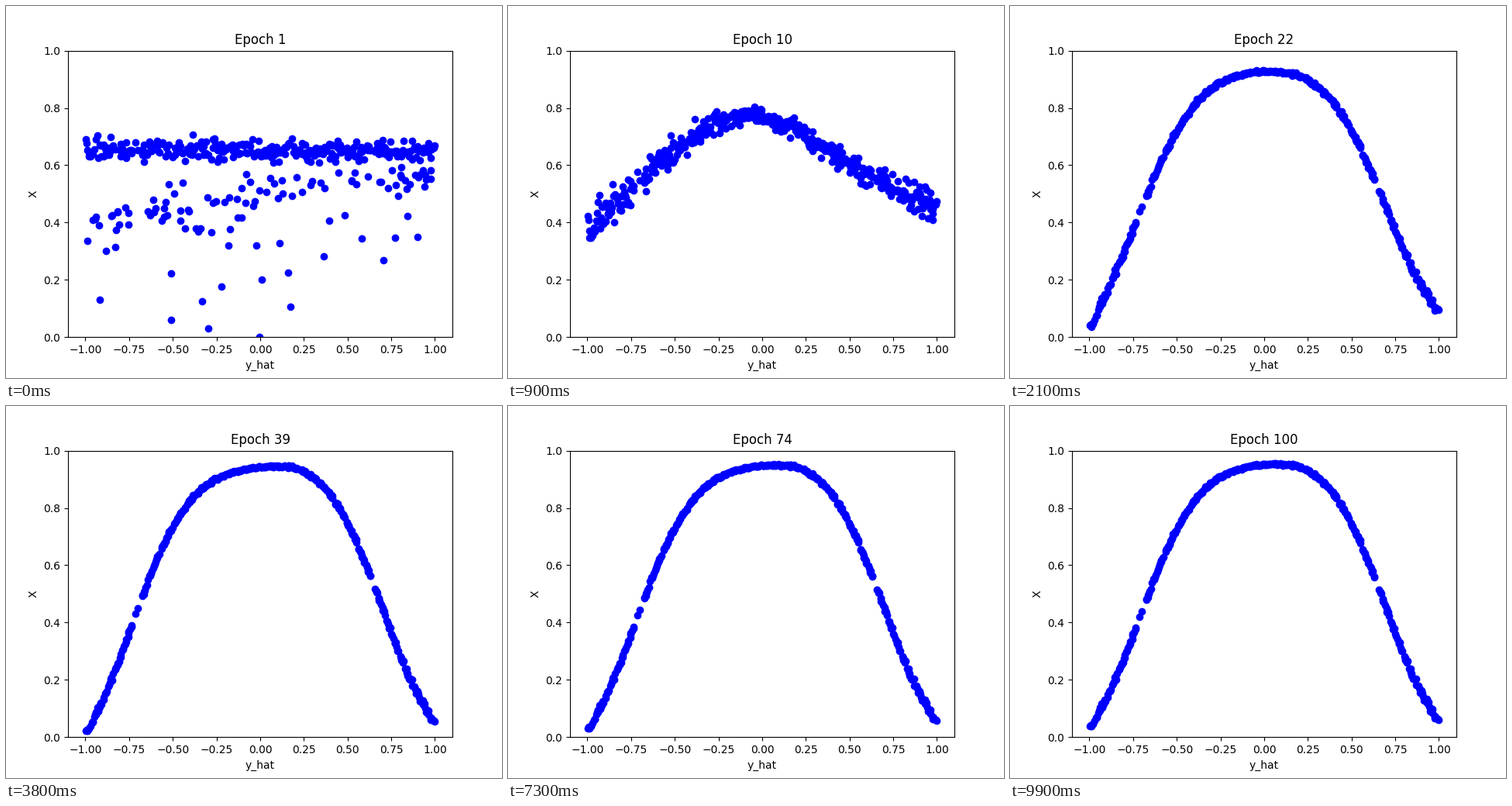
Animation of 640 by 480 pixels, one loop 10000 ms. Source, as a matplotlib script:

```python
import numpy as np
import matplotlib.pyplot as plt
from matplotlib.animation import FuncAnimation

EPOCHS = 100
SAMPLES = 410
WARMUP = 115  # samples seen before the first epoch levels off

rng = np.random.default_rng(7)

# Key points of the mean curve sit at Chebyshev nodes
NODES = -np.cos(np.linspace(0, np.pi, 9))

# epoch, easing towards it, spread (centre, growth left, growth right), values
STAGES = [
    (1, None, (.019, .004, -.003),
     [.65, .652, .656, .66, .652, .65, .648, .647, .65]),
    (10, lambda u: u ** 1.6, (.014, .023, .014),
     [.36, .42, .548, .71, .77, .65, .53, .465, .44]),
    (22, lambda u: 1 - (1 - u) ** 2, (.002, .006, .006),
     [.025, .127, .445, .823, .928, .828, .435, .152, .085]),
    (39, lambda u: 1 - (1 - u) ** 3, (.0015, .004, .005),
     [.012, .099, .439, .839, .943, .86, .435, .122, .045]),
    (100, lambda u: u, (.0015, .004, .005),
     [.028, .112, .428, .839, .952, .86, .432, .126, .05]),
]


def sample_x():
    """Evenly jittered inputs in random order, with two narrow gaps."""
    x = np.linspace(-.999, 1, SAMPLES) + rng.normal(0, .004, SAMPLES)
    x = x.clip(-.999, 1)
    gap = (abs(x + .707) < .025) | (abs(x - .64) < .009)
    x = np.append(x[~gap], [-.715, -.7])
    rng.shuffle(x)
    x[0] = -.004
    return x


def spread(x, centre, left, right):
    return centre + np.where(x < 0, left, right) * np.abs(x)


def warmup(x):
    """Predictions climbing from zero during the first samples."""
    rise = 1 - np.exp(-np.arange(len(x)) / 14)
    sd = .016 + .05 * np.exp(-((x + .25) / .35) ** 2)
    return rise * (.415 + .09 * (x + 1) + rng.normal(0, sd))


x = sample_x()
noise = rng.normal(0, 1, len(x)).clip(-2.3, 2.3)
first = warmup(x[:WARMUP])
stages = [(epoch, ease, np.polyval(np.polyfit(NODES, values, 8), x)
           + spread(x, *sd) * noise)
          for epoch, ease, sd, values in STAGES]


def predict(epoch):
    for (e0, _, y0), (e1, ease, y1) in zip(stages, stages[1:]):
        if epoch <= e1:
            y = y0 + (y1 - y0) * ease((epoch - e0) / (e1 - e0))
            break
    if epoch == 1:
        y[:WARMUP] = first
    return y


fig, ax = plt.subplots(figsize=(6.4, 4.8), dpi=100)
dots, = ax.plot([], [], "bo")
ax.set(xlim=(-1.0995, 1.1), ylim=(0, 1), xlabel="y_hat", ylabel="X")
title = ax.set_title("Epoch 1")


def update(frame):
    dots.set_data(x, predict(frame + 1))
    title.set_text(f"Epoch {frame + 1}")
    return dots, title


anim = FuncAnimation(fig, update, frames=EPOCHS, interval=100, repeat=True)
plt.show()
```
